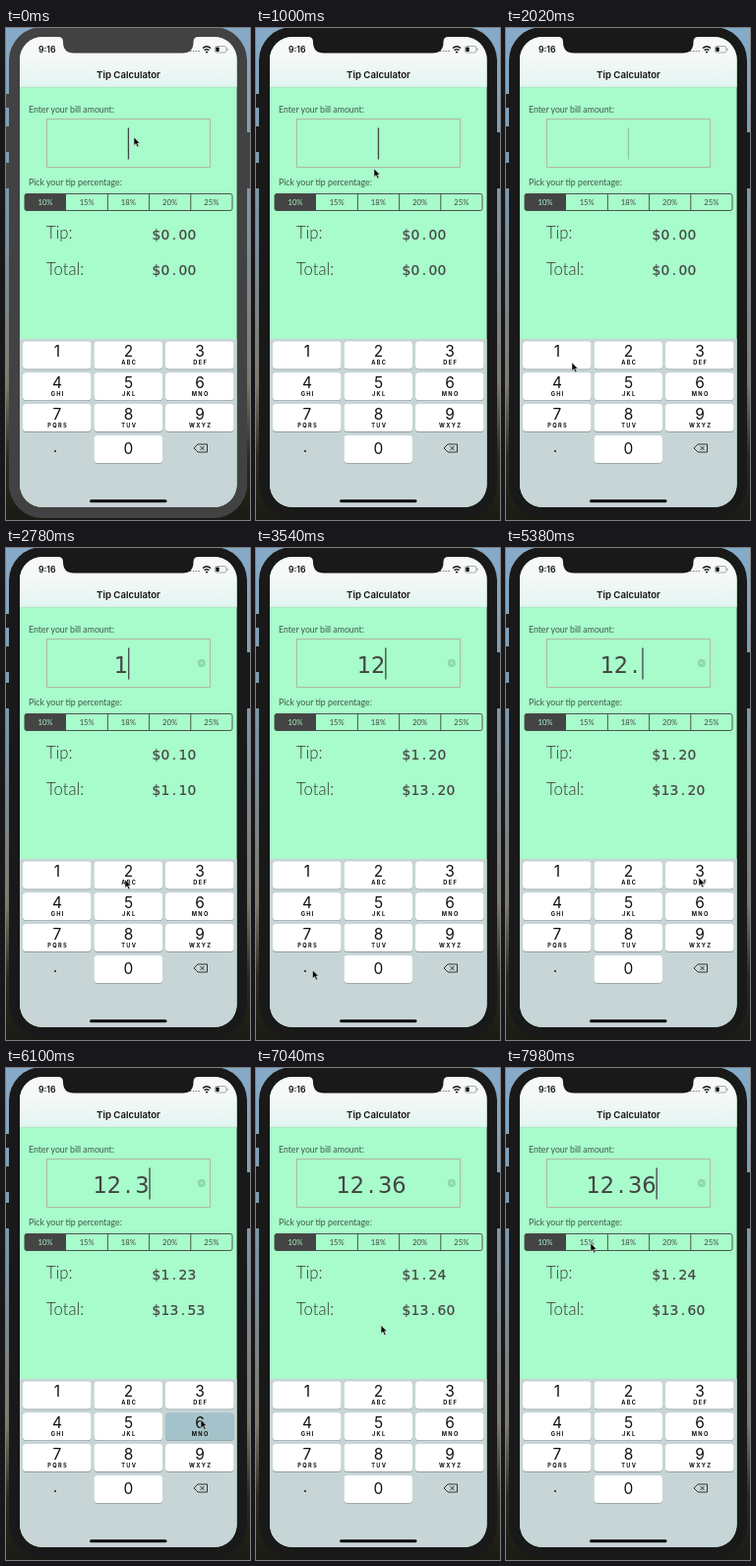
Animation of 248 by 500 pixels, one loop 8000 ms. Source, as an HTML page:

```html
<!DOCTYPE html>
<html lang="en">
<head>
<meta charset="utf-8">
<title>Tip Calculator</title>
<style>
  html, body { margin: 0; height: 100%; overflow: hidden; background: #333; }
  svg { display: block; width: 100vw; height: 100vh; }
  text { fill: #111; }
  .ui { font-family: Inter, Roboto, sans-serif; }
  .label { font-family: Lato, "Open Sans", sans-serif; fill: #3f5a4b; }
  .light { font-weight: 300; fill: #333; }
  .digits { font-family: "DejaVu Sans", sans-serif; fill: #444; }
  .mid, .digits { text-anchor: middle; }
  .key { fill: #fff; }
</style>
</head>
<body>
<svg viewBox="0 0 248 500" preserveAspectRatio="none">
  <defs>
    <linearGradient id="sky" x2="0" y2="1">
      <stop offset="0" stop-color="#86abc8"/>
      <stop offset=".4" stop-color="#7b94a4"/>
      <stop offset=".72" stop-color="#7d7a6c"/>
      <stop offset=".87" stop-color="#2b2b20"/>
      <stop offset="1" stop-color="#1a1b14"/>
    </linearGradient>
    <linearGradient id="nav" x2="0" y2="1">
      <stop offset=".35" stop-color="#f7f9f9"/>
      <stop offset="1" stop-color="#e1f5f1"/>
    </linearGradient>
    <clipPath id="screen"><rect x="14" y="9" width="220.600" height="478" rx="23"/></clipPath>
  </defs>

  <rect width="248" height="500" fill="url(#sky)"/>
  <g id="bezel">
    <path d="M0 67h4v14H0zM0 100h4v26H0zM0 137h4v26H0zM244 106h4v57h-4z"/>
    <rect x="3" y="-1" width="242" height="499" rx="34"/>
  </g>

  <g clip-path="url(#screen)">
    <rect x="14" y="8" width="221" height="482" fill="#a8fbca"/>
    <rect x="14" y="8" width="221" height="52" fill="url(#nav)"/>
    <path d="M14 60.200h221" stroke="#a9c9bd" stroke-width=".5"/>
    <rect x="14" y="316" width="221" height="174" fill="#c7d5d6"/>
    <g id="keys"></g>
  </g>
  <path id="notch" d="M53 8v1q5 0 5 5 0 11.500 11 11.500h110.500q11 0 11-11.500 0-5 5-5v-1z"/>

  <g class="ui">
    <text x="33" y="25" font-size="8.700" font-weight="600">9:16</text>
    <text class="mid" x="124.500" y="50.700" font-size="9.600" font-weight="600">Tip Calculator</text>
  </g>
  <path d="M187 23.500h10" stroke="#777" stroke-width="1.200" stroke-dasharray="1.500 1.300"/>
  <g fill="none" stroke="#111" stroke-width="1.400">
    <path d="M200 20.600q4-3.600 8 0M201.600 22.600q2.400-2 4.800 0"/>
    <path d="M203.200 24l.8.8.8-.8"/>
    <rect x="212.400" y="18.500" width="11.500" height="6.500" rx="1.800" stroke="#888" stroke-width=".7"/>
  </g>
  <rect x="213.400" y="19.500" width="3.200" height="4.500" rx=".8"/>
  <path d="M225 20.700v2" stroke="#888"/>

  <text class="label" x="23" y="86" font-size="8.750">Enter your bill amount:</text>
  <text class="label" x="23" y="159.500" font-size="8.750">Pick your tip percentage:</text>
  <text class="label light" x="41" y="214" font-size="16.700">Tip:</text>
  <text class="label light" x="41" y="250.700" font-size="16.700">Total:</text>

  <rect x="41.500" y="92.500" width="166" height="49" fill="none" stroke="#b3a796" stroke-width=".8"/>
  <text id="amount" class="digits" y="126.500" font-size="22.500"></text>
  <rect id="caret" y="101.500" width="1.300" height="32" fill="#444"/>
  <g id="clear">
    <circle cx="198.800" cy="117" r="4" fill="#8fd5ae"/>
    <path d="M197.300 115.500l3 3m0-3l-3 3" stroke="#a8fbca" stroke-width=".9"/>
  </g>

  <g id="segments"></g>
  <g font-size="13.800" stroke="#444" stroke-width=".2">
    <text id="tip" class="digits" y="214.500"></text>
    <text id="total" class="digits" y="251"></text>
  </g>

  <path d="M195 423h9.500v8H195l-4-4zM197.500 425l4 4m0-4l-4 4" fill="none" stroke="#222" stroke-width=".9"/>
  <rect x="85" y="479.300" width="78.500" height="3" rx="1.500" fill="#050505"/>
  <path id="cursor" d="M0 0v8.500l2-1.900 1.500 3.400 1.500-.7-1.500-3.200H6z" stroke="#ddd" stroke-width=".6"/>
</svg>

<script>
const LOOP = 8000;
const $ = id => document.getElementById(id);
const clamp = v => Math.max(0, Math.min(1, v));

const presses = [
  { key: "1", down: 2220, up: 2400 },
  { key: "2", down: 2850, up: 3040 },
  { key: ".", down: 3580, up: 3750 },
  { key: "3", down: 5400, up: 5610 },
  { key: "6", down: 6030, up: 6220 }
];

// time, x, y of the pointer tip
const path = [
  [0, 130, 111], [300, 130, 111], [960, 120, 143], [1300, 120, 143],
  [1980, 67, 340], [2450, 67, 340], [2780, 121, 337], [3050, 121, 337],
  [3300, 57.5, 429], [4140, 57.5, 429], [4500, 194, 357], [4700, 194, 357],
  [5150, 196, 335], [5610, 196, 335], [5760, 198, 357.5], [6580, 198, 357.5],
  [7330, 92, 214], [7560, 85, 178], [7820, 85, 178], [7960, 86, 178]
];

const letters = ["", "ABC", "DEF", "GHI", "JKL", "MNO", "PQRS", "TUV", "WXYZ"];

function keyMarkup(name, col, row, sub = "") {
  const x = 17 + col * 72.5, y = 318.5 + row * 31.8, mid = x + 35;
  const plain = name === ".";
  const shadow = plain ? "" :
    `<rect x="${x}" y="${y + .8}" width="69.500" height="28" rx="3.500" fill="#929da0"/>`;
  const base = y + (row < 3 ? 15.9 : 19.3);
  return `${shadow}
    <rect class="key" data-key="${name}" x="${x}" y="${y}" width="69.500" height="28" rx="3.500" ${plain ? 'opacity="0"' : ""}/>
    <text class="ui mid" x="${plain ? 50 : mid}" y="${plain ? 431 : base}" font-size="15.500">${name}</text>
    <text class="ui mid" x="${mid + .7}" y="${y + 23.8}" font-size="5.700" font-weight="700" letter-spacing="1.300">${sub}</text>`;
}

$("keys").innerHTML = letters.map((sub, i) =>
  keyMarkup(String(i + 1), i % 3, Math.floor(i / 3), sub)).join("") +
  keyMarkup(".", 0, 3) + keyMarkup("0", 1, 3);

$("segments").innerHTML =
  `<rect x="19" y="168.500" width="211" height="17" rx="2" fill="none" stroke="#444" stroke-width=".9"/>
   <path d="M61 168.500H21q-2 0-2 2v13q0 2 2 2h40z" fill="#444"/>
   <path d="M103.400 168.500v17M145.600 168.500v17M187.800 168.500v17" stroke="#444" stroke-width=".9"/>` +
  [10, 15, 18, 20, 25].map((p, i) =>
    `<text class="label mid" x="${40 + i * 42.2}" y="179.700" font-size="7.700"
      style="fill:${i ? "#444" : "#a8fbca"}">${p}%</text>`).join("");

// Centres every character in an equally wide cell.
function setDigits(id, text, left, pitch) {
  $(id).textContent = text;
  $(id).setAttribute("x", [...text].map((_, i) => left + (i + .5) * pitch).join(" "));
}

function pointerAt(t) {
  const next = path.findIndex(p => p[0] > t);
  if (next < 0) return path[path.length - 1].slice(1);
  const [t0, x0, y0] = path[next - 1], [t1, x1, y1] = path[next];
  const u = (t - t0) / (t1 - t0), e = u * u * (3 - 2 * u);
  return [x0 + (x1 - x0) * e, y0 + (y1 - y0) * e];
}

// Each keystroke restarts the blink: hold, fade out, pause, fade in.
function caretOpacity(t, lastTyped) {
  const phase = (t - lastTyped) % 1300;
  return phase < 900 ? 1 - clamp((phase - 500) / 250) : clamp((phase - 1000) / 250);
}

function draw(t) {
  const typed = presses.filter(p => t >= p.up);
  const amount = typed.map(p => p.key).join("");
  const value = Number(amount) || 0;
  const half = amount.length * 7.1;
  setDigits("amount", amount, 117 - half, 14.2);
  setDigits("tip", "$" + (value * .1).toFixed(2), 148.5, 9);
  setDigits("total", "$" + (value * 1.1).toFixed(2), 148.5, 9);
  $("clear").setAttribute("visibility", amount ? "visible" : "hidden");

  const lastTyped = typed.length ? typed[typed.length - 1].up : -350;
  $("caret").setAttribute("x", amount ? 117 + half : 123.8);
  $("caret").setAttribute("opacity", caretOpacity(t, lastTyped));

  const held = presses.find(p => t >= p.down && t < p.up);
  document.querySelectorAll(".key").forEach(el => {
    const on = held && held.key === el.dataset.key;
    if (el.dataset.key === ".") el.setAttribute("opacity", on ? 1 : 0);
    else el.style.fill = on ? "#a4c2c9" : "";
  });

  const shade = Math.round(66 - 41 * clamp((t - 20) / 280));
  for (const id of ["bezel", "notch"]) $(id).setAttribute("fill", `rgb(${shade},${shade},${shade})`);

  $("cursor").setAttribute("transform", `translate(${pointerAt(t)})`);
}

function frame() {
  draw(performance.now() % LOOP);
  requestAnimationFrame(frame);
}
frame();
</script>
</body>
</html>
```
